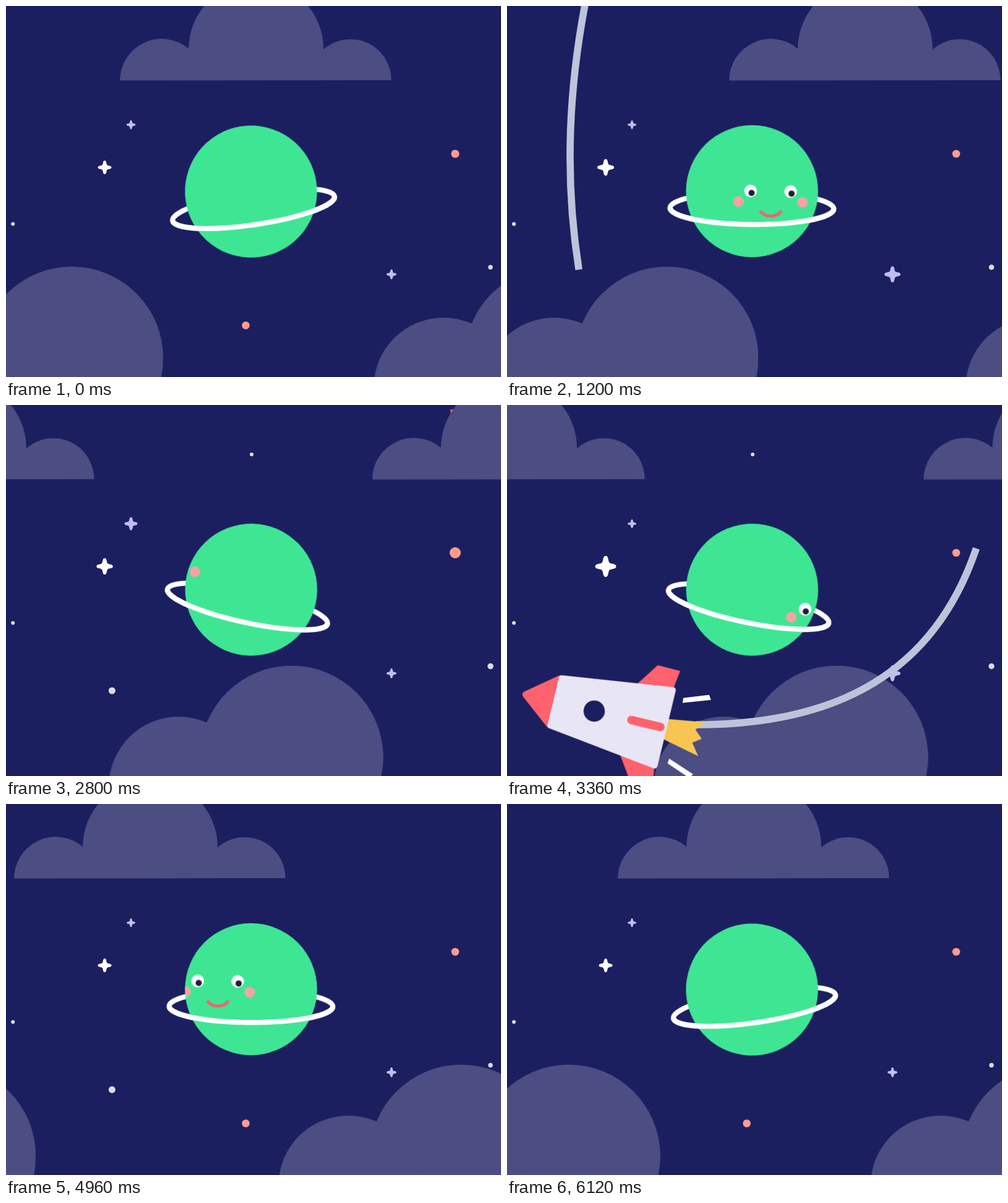
Recreate the animation shown at these times as an HTML page. Size 800x600 px, loop 6.16 s.

```html
<!DOCTYPE html>
<html lang="en">
<head>
<meta charset="utf-8">
<title>Little planet</title>
<style>
  html, body { margin: 0; width: 100%; height: 100%; overflow: hidden; background: #1b1f60; }
  svg { display: block; width: 100vw; height: 100vh; }
  .cloud { fill: #4b4d83; animation: drift 6160ms linear infinite; }
  .tilt { animation: tilt 6160ms linear infinite; }
  .face { animation: face 6160ms linear infinite; }
  .ring { fill: none; stroke: #fff; stroke-width: 8.2; }
  .trail { fill: none; stroke: #bdc4d9; stroke-width: 11.6; }
  @keyframes drift {
    from { transform: translateX(var(--from)); }
    to { transform: translateX(var(--to)); }
  }
  @keyframes tilt {
    0%, 100% { transform: rotate(-8.5deg); }
    49.35% { transform: rotate(14deg); }
  }
  /* the face crosses the planet twice per loop */
  @keyframes face {
    0% { transform: translate(126.3px, 19.2px); }
    48.7% { transform: translate(-204.9px, -30.9px); }
    48.701% { transform: translate(126.3px, 19.2px); }
    100% { transform: translate(-222.6px, -33.6px); }
  }
</style>
</head>
<body>
<svg viewBox="0 0 800 600">
  <defs>
    <g id="low">
      <circle cx="106" cy="569.5" r="148"/>
      <circle cx="-76.5" cy="617" r="113"/>
    </g>
    <path id="high" d="M184 120.5A67.5 67.5 0 0 1 295 69A109 109 0 1 1 513 70A66 66 0 0 1 622.5 120Z"/>
    <path id="star" d="M0-10C2.2-10 2.2-7.5 3-4.5Q3.4-3.4 4.5-3C7.5-2.2 10-2.2 10 0C10 2.2 7.5 2.2 4.5 3Q3.4 3.4 3 4.5C2.2 7.5 2.2 10 0 10C-2.2 10-2.2 7.5-3 4.5Q-3.4 3.4-4.5 3C-7.5 2.2-10 2.2-10 0C-10-2.2-7.5-2.2-4.5-3Q-3.4-3.4-3-4.5C-2.2-7.5-2.2-10 0-10Z"/>
    <circle id="dot" r="10"/>
    <clipPath id="disc"><circle cx="-4" cy="-.5" r="106.7"/></clipPath>
    <g id="eye">
      <circle r="10.2" fill="#fff"/>
      <circle cx="1.6" cy="3.3" r="5" fill="#1b2038"/>
    </g>
    <circle id="cheek" r="8.2" fill="#f9a2a4" stroke="#f9a2a4" stroke-opacity=".45" stroke-width="1.4"/>
    <path id="fin" d="M50-56L84-33L83.5-.5L56-4Z" fill="#ff626c"/>
    <path id="spark" d="M40.5 13.5L47.5 13L60.3 47.3L54 51.5Z" fill="#fff"/>
  </defs>

  <g id="sky"></g>

  <use href="#low" class="cloud" style="--from:0px;--to:782px"/>
  <use href="#low" class="cloud" style="--from:-1059px;--to:.4px"/>
  <use href="#low" class="cloud" style="--from:783.5px;--to:1538px"/>

  <g transform="translate(400 300)">
    <g class="tilt">
      <ellipse class="ring" cx="-4" cy="27.3" rx="132.3" ry="26"/>
      <circle cx="-4" cy="-.5" r="106.7" fill="#3ee694"/>
      <g clip-path="url(#disc)">
        <g class="face">
          <use href="#cheek" x="-19.5" y="17.3"/>
          <use href="#cheek" x="84" y="18"/>
          <use href="#eye"/>
          <use href="#eye" x="64.6" y=".6"/>
          <path d="M15.5 32A21.6 21.6 0 0 0 50 32" fill="none" stroke="#ee626f" stroke-width="5"/>
        </g>
      </g>
      <path class="ring" d="M-136.3 27.3A132.3 26 0 0 0 128.3 27.3"/>
    </g>
  </g>

  <path class="trail" id="trail0"/>
  <path class="trail" id="trail1"/>
  <g id="rocket" visibility="hidden">
    <g transform="translate(0 105)">
      <use href="#spark"/>
      <use href="#spark" transform="scale(-1 1)"/>
      <path d="M-15-4L-27.5 52.5L-11 40L-2.5 51.5L8 40L21.5 51.5L13-4Z" fill="#f6c552"/>
      <use href="#fin"/>
      <use href="#fin" transform="scale(-1 1)"/>
      <path d="M-34.5-160.7H34.5L55-4H-55Z" fill="#e8e6f4" stroke="#e8e6f4" stroke-width="8" stroke-linejoin="round"/>
      <path d="M-37.5-164.5L-4-207Q0-211.5 4-207L37.5-164.5Z" fill="#ff626c"/>
      <circle cy="-105" r="15" fill="#1b1f60"/>
      <path d="M0-51V-9" stroke="#ff626c" stroke-width="12" stroke-linecap="round"/>
    </g>
  </g>

  <use href="#high" class="cloud" style="--from:0px;--to:897px"/>
  <use href="#high" class="cloud" style="--from:-881px;--to:.6px"/>
</svg>
<script>
const LOOP = 6160, PULSE = 690, LAG = 453;
const NS = 'http://www.w3.org/2000/svg';
const $ = id => document.getElementById(id);
const clamp = (v, lo, hi) => Math.min(hi, Math.max(lo, v));

// shape, x, y, resting radius, growth, colour, pulse centres in ms
const lights = [
  ['star', 159.5, 261, 11, 6.6, '#fff', 800, 3220],
  ['star', 202, 192, 7, 4, '#c1bdf0', 560, 2640],
  ['star', 623, 434, 8, 5.2, '#c1bdf0', 1300, 3460],
  ['dot', 726, 239, 6.3, 3.1, '#ff9b8f', 560, 2640],
  ['dot', 387.5, 516.5, 6.3, 3, '#ff9b8f', 1760, 4060],
  ['dot', 171.3, 462, 5.5, 2.8, '#dfdaea', 1760, 4060],
  ['dot', 397, 80, 3, .8, '#dfdaea', 1760, 4060],
  ['dot', 11.2, 352.5, 3, 1.3, '#dfdaea', 1760, 4060],
  ['dot', 783, 422.5, 3.7, 1.6, '#dfdaea', 800, 3060]
].map(([shape, x, y, r, grow, color, ...peaks]) => {
  const el = document.createElementNS(NS, 'use');
  el.setAttribute('href', '#' + shape);
  el.setAttribute('fill', color);
  $('sky').append(el);
  return { el, x, y, r, grow, peaks };
});

const bump = d => Math.abs(d) < PULSE ? (1 + Math.cos(Math.PI * d / PULSE)) / 2 : 0;

function twinkle(t) {
  for (const { el, x, y, r, grow, peaks } of lights) {
    const size = r + grow * peaks.reduce((sum, p) => sum + bump(t - p), 0);
    el.setAttribute('transform', `translate(${x} ${y}) scale(${size / 10})`);
  }
}

function pathLength(d) {
  const p = document.createElementNS(NS, 'path');
  p.setAttribute('d', d);
  return p.getTotalLength();
}

const entry = 'M740-100Q760-30 772.5 58.5';
const sweep = entry + 'C782 125 779 170 759 230C683 458 500 514 320 517C255 518 195 508 141 495';
const from = pathLength(entry), to = pathLength(sweep);

// at: distance flown at time ref; speed in px per ms
const flights = [
  { d: 'M222 780C105 500 45 220 176-200', ref: 800, at: 439, speed: 1.3, size: 1, growth: -.00072 },
  { d: sweep + 'Q-60 446.5-260 330', ref: 2800, at: from, speed: (to - from) / 560, size: .56, growth: .585 / 560 }
];
flights.forEach((f, i) => {
  f.trail = $('trail' + i);
  f.trail.setAttribute('d', f.d);
  f.length = f.trail.getTotalLength();
});

function fly(t) {
  let pose = null;
  for (const f of flights) {
    const flown = time => f.at + f.speed * (time - f.ref);
    const s = flown(t), scale = f.size + f.growth * (t - f.ref);
    const tail = clamp(flown(t - LAG), 0, f.length);
    const head = clamp(s - 145 * scale, 0, f.length);
    f.trail.setAttribute('visibility', head > tail ? 'visible' : 'hidden');
    f.trail.setAttribute('stroke-dasharray', `0 ${tail} ${Math.max(0, head - tail)} 9999`);
    if (s > 0 && s < f.length) {
      const p = f.trail.getPointAtLength(s);
      const a = f.trail.getPointAtLength(s - 1), b = f.trail.getPointAtLength(s + 1);
      const turn = Math.atan2(b.x - a.x, a.y - b.y) * 180 / Math.PI;
      pose = `translate(${p.x} ${p.y}) rotate(${turn}) scale(${scale})`;
    }
  }
  $('rocket').setAttribute('visibility', pose ? 'visible' : 'hidden');
  if (pose) $('rocket').setAttribute('transform', pose);
}

function draw(t) {
  twinkle(t);
  fly(t);
}

let start;
function tick(now) {
  start ??= now;
  draw((now - start) % LOOP);
  requestAnimationFrame(tick);
}
draw(0);
requestAnimationFrame(tick);
</script>
</body>
</html>
```
